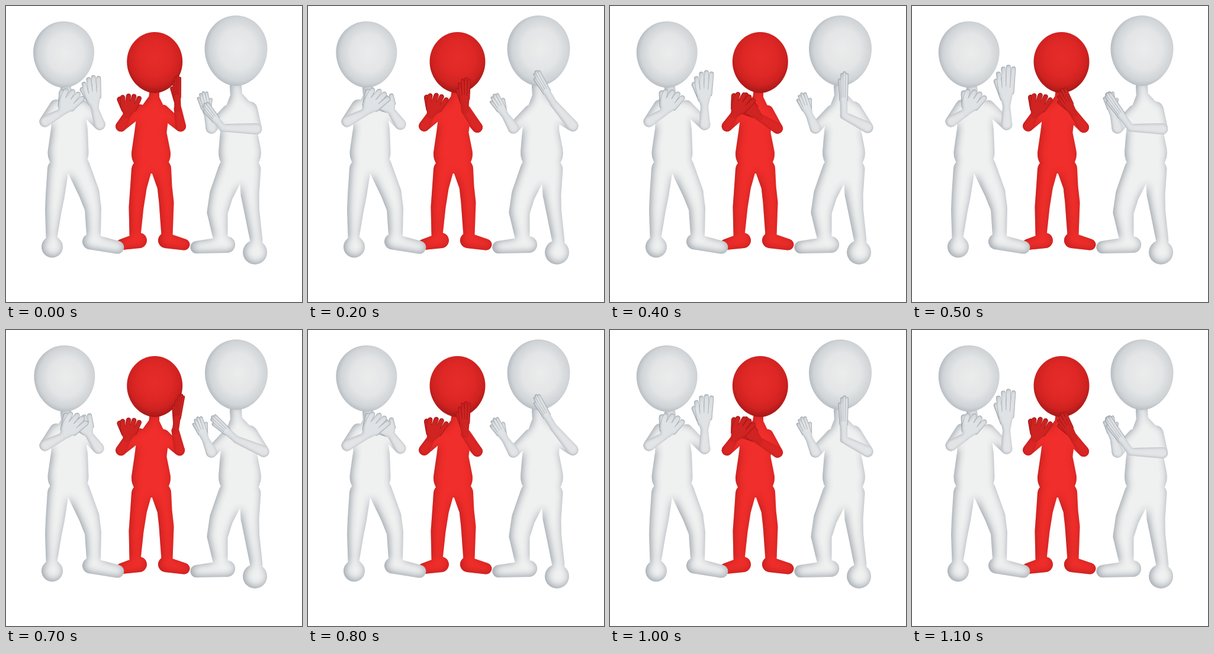
An HTML page for the animation above (1200 ms loop, 500 px wide and 500 px high).

```html
<!DOCTYPE html>
<html lang="en">
<head>
<meta charset="utf-8">
<title>Three figures clapping</title>
<style>
  html, body { margin: 0; width: 100%; height: 100%; overflow: hidden; background: #fff; }
  svg { display: block; width: 100%; height: 100%; }
</style>
</head>
<body>
<svg id="stage" viewBox="0 0 500 500"></svg>
<script>
const STEP = 100, POSES = 6;

const themes = {
  white: { skin: '#eff0f0', arm: '#e2e4e6', hand: '#e0e3e5', edge: '#9fa7ae', shade: '#818b95', depth: .9,
           head: ['#ececec', '#e3e5e6', '#d0d4d7', '#a4acb3'], focus: [.53, .48] },
  red:   { skin: '#f02e2b', arm: '#da2725', hand: '#cf2422', edge: '#991615', shade: '#9a1313', depth: .65,
           head: ['#e62c29', '#df2826', '#cf2220', '#a31817'], focus: [.5, .42] }
};

// Body parts are chains of circles [x, y, radius].
// Arms are rules of s and q, the cosine and sine of the clap cycle.
const people = [
  { theme: 'red', peak: 3.5, sway: 1.5, head: [252.5, 94, 47, 50, 53],
    body: [
      [[251, 140, 8], [250, 156, 9], [247, 191, 27], [244, 215, 27], [245, 250, 33]],
      [[229, 276, 17], [224, 305, 14], [220, 340, 12.5], [218, 387, 9.5]],
      [[262, 275, 17], [268, 305, 12.5], [271, 332, 12.5], [272, 387, 9.5]],
      [[225, 396, 13], [195, 403, 9]],
      [[270, 396, 13], [301, 403, 9.5]]
    ],
    shoulders: [[227, 176, 10], [265, 178, 11]], elbowSize: 9,
    steady: s => ({ elbow: [196 + 2 * s, 203], wrist: [207 + 3 * s, 184], tip: [223 + 12 * s, 148], width: 27, thumb: -1 }),
    swing: (s, q) => ({
      elbow: [288 - 7 * s + 2 * q, 205 + 2 * s],
      wrist: [269 - 22 * s + 4 * q, 179 + 8 * s + 3 * q],
      tip: [257 - 40 * s - 7 * q, 131 + 21 * s + 10 * q],
      width: 16 + 7 * s, thumb: -1
    }) },
  { theme: 'white', peak: 1.5, sway: 1.5, head: [97.5, 78, 51.5, 52, 60],
    body: [
      [[101, 138, 9], [103, 154, 10], [106, 187, 29], [107, 210, 31], [105, 248, 34.5]],
      [[88, 275, 18], [83, 320, 16], [80, 345, 14], [77, 390, 9.5]],
      [[122, 272, 20], [140, 315, 17.5], [147, 342, 14], [148, 386, 12]],
      [[78, 401, 14], [78, 407, 18]],
      [[143, 398, 13.5], [188, 407.5, 11]]
    ],
    shoulders: [[85, 170, 12], [129, 170, 11]], elbowSize: 9.5,
    steady: s => ({ elbow: [66, 195], wrist: [93 + 3 * s, 180], tip: [120 + 9 * s, 143], width: 29, thumb: -1 }),
    swing: (s, q) => ({
      elbow: [158 - 2 * s, 200],
      wrist: [150 - 11 * s, 174 + 4 * s],
      tip: [143 - 18 * s, 127 + 26 * s + 9 * q],
      width: 25, thumb: -1
    }) },
  { theme: 'white', peak: 2.5, sway: .6, swingInFront: true, head: [389, 72, 53, 56, 63],
    body: [
      [[388, 136, 10], [389, 152, 10], [396, 187, 29], [393, 212, 31], [395, 248, 36]],
      [[381, 278, 23], [364, 318, 20], [357, 348, 17.5], [362, 390, 12.5]],
      [[412, 275, 18.5], [412, 318, 15.5], [415, 345, 13], [423, 397, 10.5]],
      [[373, 403, 14], [322, 407.5, 10.5]],
      [[423, 408, 13], [420.5, 416, 20.5]]
    ],
    shoulders: [[374, 178, 10], [411, 175, 14]], elbowSize: 9.5,
    steady: s => ({ elbow: [347, 206], wrist: [338 - 4 * s, 187], tip: [321 - 11 * s, 148 + 3 * s], width: 15, thumb: 1 }),
    swing: (s, q) => ({
      elbow: [435 + 14 * s, 205 - 3 * s],
      wrist: [392 + 28 * s + 3 * q, 185 - 24 * s],
      tip: [370 + 46 * s + 24 * q + 35 * s * q, 129 - 32 * s - 18 * q],
      width: 12, thumb: 0
    }) }
];

const shape = (d, fill) => `<path d="${d}" fill="${fill}"/>`;
const group = (content, filter) => `<g filter="url(#${filter})">${content}</g>`;

// Outline around two circles joined by their common tangents.
function limb([x1, y1, r1], [x2, y2, r2]) {
  const dir = Math.atan2(y2 - y1, x2 - x1);
  const lean = Math.acos((r1 - r2) / Math.hypot(x2 - x1, y2 - y1));
  const at = (x, y, r, a) => `${(x + r * Math.cos(a)).toFixed(1)} ${(y + r * Math.sin(a)).toFixed(1)}`;
  return `M${at(x1, y1, r1, dir + lean)}L${at(x2, y2, r2, dir + lean)}` +
    `A${r2} ${r2} 0 ${+(r2 > r1)} 0 ${at(x2, y2, r2, dir - lean)}L${at(x1, y1, r1, dir - lean)}` +
    `A${r1} ${r1} 0 ${+(r1 > r2)} 0 ${at(x1, y1, r1, dir + lean)}Z`;
}

const chain = circles => circles.slice(1).map((c, i) => limb(circles[i], c)).join('');

// Drawn pointing along +x, then turned into place.
function hand({ wrist: [x, y], tip: [tipX, tipY], width, thumb }, { hand: fill, edge }) {
  const length = Math.hypot(tipX - x, tipY - y);
  const turn = Math.atan2(tipY - y, tipX - x) * 180 / Math.PI;
  const thick = Math.max(4.5, width / 3.6);
  const palm = width * .36 + 2;
  const finger = (x1, y1, x2, y2, w) => [[edge, w + .8], [fill, w - .5]].map(([color, size]) =>
    `<path d="M${x1} ${y1}L${x2} ${y2}" stroke="${color}" stroke-width="${size}" stroke-linecap="round"/>`).join('');
  let out = thumb ? finger(length * .2, thumb * width * .25, length * .62, thumb * (width * .55 + 3), thick + 1) : '';
  for (let i = 0; i < 4; i++) {
    const side = (i - 1.5) / 3 * width;
    const reach = 1 - .04 * (i - 2) ** 2;
    out += finger(length * .35, side * .75, length * reach - thick / 2, side * 1.02, thick);
  }
  out += shape(limb([0, 0, Math.min(6, palm)], [length * .33, 0, palm]), fill);
  return `<g transform="translate(${x} ${y}) rotate(${turn})">${out}</g>`;
}

function forearm(arm, size, theme) {
  return group(shape(limb([...arm.elbow, size], [...arm.wrist, 6.5]), theme.arm) + hand(arm, theme), 'fine-' + theme.name);
}

function head([cx, cy, rx, ry, drop], dx, theme) {
  const x = cx + dx, k = .55;
  return shape(`M${x - rx} ${cy}C${x - rx} ${cy - ry * k} ${x - rx * k} ${cy - ry} ${x} ${cy - ry}
    S${x + rx} ${cy - ry * k} ${x + rx} ${cy}C${x + rx} ${cy + drop * k} ${x + rx * .5} ${cy + drop} ${x} ${cy + drop}
    S${x - rx} ${cy + drop * k} ${x - rx} ${cy}Z`, `url(#head-${theme.name})`);
}

function person(p, pose) {
  const theme = themes[p.theme];
  const phase = (pose - p.peak) * 2 * Math.PI / POSES;
  const s = Math.cos(phase), q = Math.sin(phase);
  const arms = [p.steady(s), p.swing(s, q)];
  const upperArms = arms.map((arm, i) => limb(p.shoulders[i], [...arm.elbow, p.elbowSize]));
  const torso = [...p.body.map(chain), ...upperArms].map(d => shape(d, theme.skin)).join('');
  const forearms = arms.map(arm => forearm(arm, p.elbowSize, theme));
  if (!p.swingInFront) forearms.reverse();
  return group(torso, 'soft-' + theme.name) + head(p.head, p.sway * s, theme) + forearms.join('');
}

// Darkens a silhouette towards its rim.
const rimFilter = (id, blur, dx, color, strength) => `
  <filter id="${id}" filterUnits="userSpaceOnUse" x="0" y="0" width="500" height="500" color-interpolation-filters="sRGB">
    <feGaussianBlur in="SourceAlpha" stdDeviation="${blur}"/>
    <feOffset dx="${dx}" dy="${-dx / 2}"/>
    <feComponentTransfer result="rim"><feFuncA type="linear" slope="${-strength}" intercept="${strength}"/></feComponentTransfer>
    <feFlood flood-color="${color}"/>
    <feComposite in2="rim" operator="in"/>
    <feComposite in2="SourceAlpha" operator="in" result="shadow"/>
    <feMerge><feMergeNode in="SourceGraphic"/><feMergeNode in="shadow"/></feMerge>
  </filter>`;

function definitions([name, theme]) {
  theme.name = name;
  const [fx, fy] = theme.focus;
  const stops = theme.head.map((c, i) => `<stop offset="${[0, .5, .78, 1][i]}" stop-color="${c}"/>`).join('');
  return `<radialGradient id="head-${name}" cx="${fx}" cy="${fy}" r=".58">${stops}</radialGradient>` +
    rimFilter('soft-' + name, 7, 1.5, theme.shade, theme.depth) +
    rimFilter('fine-' + name, 2.5, .6, theme.shade, theme.depth * .75);
}

const stage = document.getElementById('stage');
const defs = Object.entries(themes).map(definitions).join('');
const frames = Array.from({ length: POSES }, (_, pose) =>
  `<g class="pose" display="none">${people.map(p => person(p, pose)).join('')}</g>`);
stage.innerHTML = `<defs>${defs}</defs>${frames.join('')}`;

const poses = stage.querySelectorAll('.pose');
const start = performance.now();
let current = -1;

function update(now) {
  const next = Math.floor(Math.max(0, now - start) / STEP) % POSES;
  if (next !== current) {
    poses.forEach((g, i) => g.setAttribute('display', i === next ? 'inline' : 'none'));
    current = next;
  }
  requestAnimationFrame(update);
}
update(start);
</script>
</body>
</html>
```
